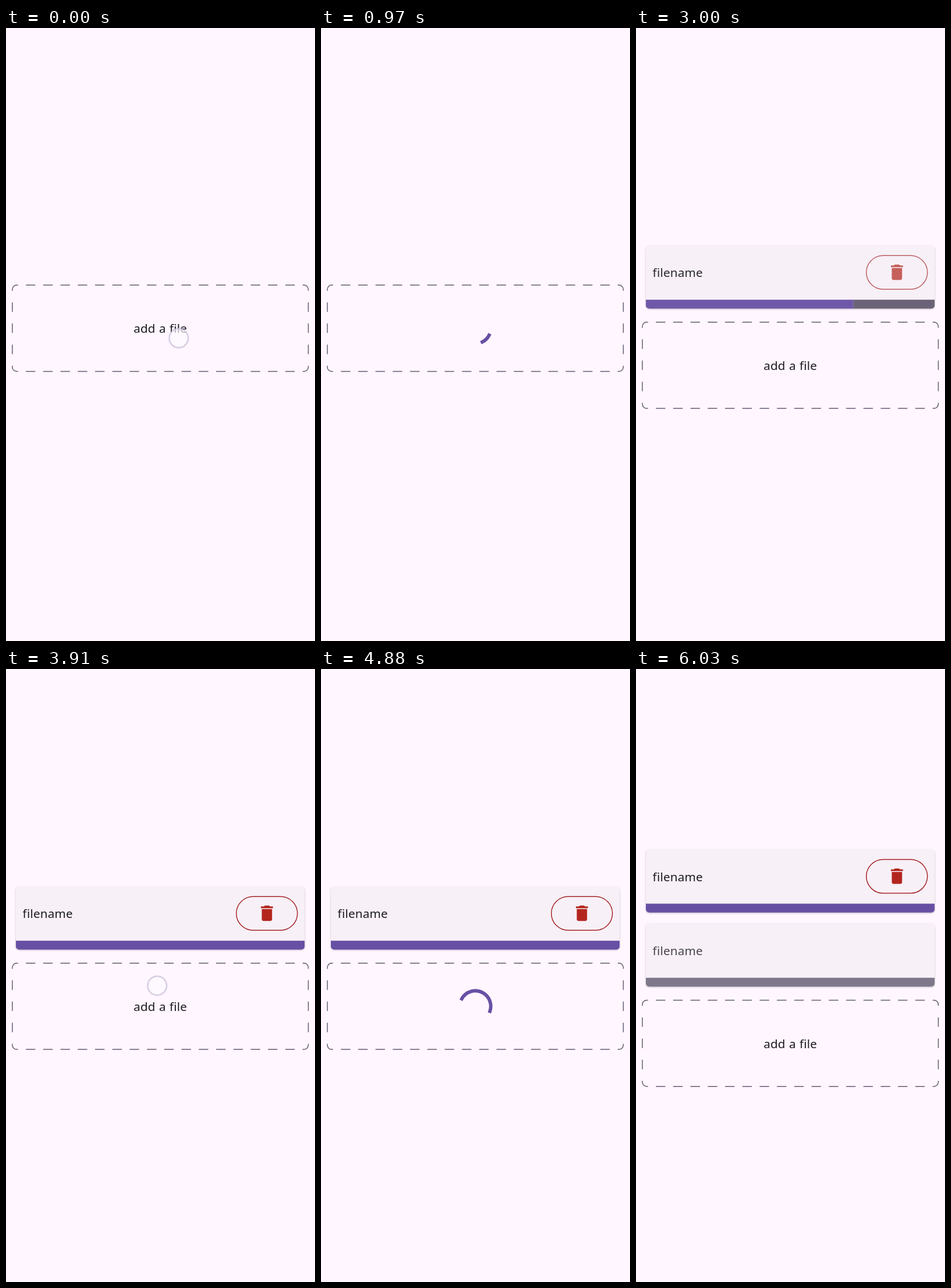
Animation, 531 px wide and 1054 px high, one loop 6210 ms. Source, as an HTML page with a canvas:

```html
<!DOCTYPE html>
<html lang="en">
<head>
<meta charset="utf-8">
<title>File upload</title>
<style>
  html, body { margin: 0; width: 100%; height: 100%; overflow: hidden; background: #fff6ff; }
  canvas { display: block; }
</style>
</head>
<body>
<canvas id="stage" width="531" height="1054"></canvas>
<script>
const ctx = document.getElementById('stage').getContext('2d');
const LOOP = 6210;
const DP = 1.475;            // pixels per layout unit
const HALF_SLOT = 63.7;      // half the height one card takes in the list
const MID_X = 265.2;
const CARD_Y = 428;
const COLOR = {
  page: '#fff6ff', card: '#f7f0f7', text: '#1d1b20', track: '#625b71',
  primary: '#6750a4', danger: '#b3261e', outline: '#a52428'
};
const BIN = new Path2D('M6 19c0 1.1.9 2 2 2h8c1.1 0 2-.9 2-2V7H6v12z' +
                       'M19 4h-3.5l-1-1h-5l-1 1H5v2h14V4z');

const clamp = x => Math.min(1, Math.max(0, x));
const interval = (x, from, to) => clamp((x - from) / (to - from));

function bezier(x1, y1, x2, y2) {
  const at = (a, b, u) => 3 * (1 - u) ** 2 * u * a + 3 * (1 - u) * u * u * b + u ** 3;
  return x => {
    if (x <= 0 || x >= 1) return clamp(x);
    let low = 0, high = 1;
    for (let i = 0; i < 24; i++) {
      const mid = (low + high) / 2;
      if (at(x1, x2, mid) < x) low = mid; else high = mid;
    }
    return at(y1, y2, low);
  };
}
const fastOutSlowIn = bezier(.4, 0, .2, 1);
const easeInOut = bezier(.42, 0, .58, 1);
const easeOutQuart = x => 1 - (1 - x) ** 4;

// A new card first opens its slot, then fades in.
function insertion(t, start) {
  const p = easeInOut(interval(t, start, start + 500));
  return { size: interval(p, 0, 2 / 3), fade: interval(p, 2 / 3, 1) };
}

function label(text, x, y) {
  ctx.font = `${14 * DP}px "Noto Sans", sans-serif`;
  ctx.letterSpacing = '0.2px';
  ctx.wordSpacing = '0.6px';
  ctx.fillStyle = COLOR.text;
  ctx.fillText(text, x, y);
}

function dashedBox(y) {
  const w = 254.3, h = 74.2, dash = 16.3, radius = 7.5, reach = 9.7;
  ctx.save();
  ctx.translate(MID_X, y);
  ctx.strokeStyle = COLOR.track;
  ctx.lineWidth = DP;
  ctx.beginPath();
  for (const sy of [-1, 1]) {
    for (let i = -7.5; i <= 7.5; i++) {
      ctx.moveTo(i * 29.72 - dash / 2, sy * h);
      ctx.lineTo(i * 29.72 + dash / 2, sy * h);
    }
  }
  for (const sx of [-1, 1]) {
    for (let i = -1; i <= 1; i++) {
      ctx.moveTo(sx * w, i * 36.4 - dash / 2);
      ctx.lineTo(sx * w, i * 36.4 + dash / 2);
    }
    for (const sy of [-1, 1]) {
      ctx.moveTo(sx * w, sy * (h - reach));
      ctx.arcTo(sx * w, sy * h, sx * (w - reach), sy * h, radius);
      ctx.lineTo(sx * (w - reach), sy * h);
    }
  }
  ctx.stroke();
  ctx.restore();
}

function spinner(y, elapsed) {
  const cycle = elapsed / 1333 % 1;
  const head = fastOutSlowIn(interval(cycle, 0, .5)) * 1.5 * Math.PI;
  const tail = fastOutSlowIn(interval(cycle, .5, 1)) * 1.5 * Math.PI;
  const start = -Math.PI / 2 + tail + elapsed / 2222 * 2 * Math.PI + cycle * Math.PI / 2;
  ctx.strokeStyle = COLOR.primary;
  ctx.lineWidth = 4 * DP;
  ctx.lineCap = 'square';
  ctx.beginPath();
  ctx.arc(MID_X, y, 18 * DP, start, start + Math.max(head - tail, .001));
  ctx.stroke();
  ctx.lineCap = 'butt';
}

function touch(x, y) {
  ctx.save();
  ctx.beginPath();
  ctx.arc(x, y, 16.3, 0, 2 * Math.PI);
  ctx.fillStyle = 'rgba(253, 251, 255, .7)';
  ctx.fill();
  ctx.strokeStyle = '#d2c8df';
  ctx.lineWidth = 1.6;
  ctx.shadowColor = 'rgba(170, 155, 195, .5)';
  ctx.shadowBlur = 2;
  ctx.stroke();
  ctx.restore();
}

function deleteButton() {
  ctx.strokeStyle = COLOR.outline;
  ctx.lineWidth = DP;
  ctx.beginPath();
  ctx.roundRect(395.8, -36.7, 105, 58, 29);
  ctx.stroke();
  ctx.translate(430.7, -25.7);
  ctx.scale(DP, DP);
  ctx.fillStyle = COLOR.danger;
  ctx.fill(BIN);
}

function card(y, { size, fade }, done) {
  if (!fade) return;
  const left = 16.8, width = 496.6, top = -54.2, height = 108.6, barTop = 39.2;
  const content = fade * (.8 + .2 * done);
  ctx.save();
  ctx.beginPath();
  ctx.rect(0, y - HALF_SLOT * size, 531, 2 * HALF_SLOT * size);
  ctx.clip();
  ctx.translate(0, y);

  ctx.save();
  ctx.globalAlpha = fade;
  ctx.shadowColor = 'rgba(0, 0, 0, .25)';
  ctx.shadowBlur = 2.5;
  ctx.shadowOffsetY = 1.2;
  ctx.fillStyle = COLOR.card;
  ctx.beginPath();
  ctx.roundRect(left, top, width, height, 6);
  ctx.fill();
  ctx.restore();

  ctx.save();
  ctx.clip();
  ctx.globalAlpha = content;
  ctx.fillStyle = COLOR.track;
  ctx.fillRect(left + width * done, barTop, width * (1 - done), 16);
  ctx.fillStyle = COLOR.primary;
  ctx.fillRect(left, barTop, width * done, 16);
  ctx.restore();

  ctx.globalAlpha = content;
  label('filename', 28.6, .3);
  ctx.globalAlpha = fade * done;
  if (done) deleteButton();
  ctx.restore();
}

function draw(t) {
  const first = insertion(t, 1290);
  const second = insertion(t, 5190);
  const uploaded = easeOutQuart(interval(t, 2860, 3380));
  const dropY = 516.2 + HALF_SLOT * (first.size + second.size);

  ctx.fillStyle = COLOR.page;
  ctx.fillRect(0, 0, 531, 1054);
  card(CARD_Y - HALF_SLOT * second.size, first, uploaded);
  card(CARD_Y + HALF_SLOT, second, 0);
  dashedBox(dropY);

  if (t >= 30 && t < 1300) spinner(dropY, t + 88);
  else if (t >= 4000 && t < 5180) spinner(dropY, Math.max(0, t - 4014));
  else label('add a file', 219.2, dropY + 8);

  if (t < 30) touch(296.8, 533.3);
  if (t >= 3910 && t < 4000) touch(259.8, 544.5);
}

function frame() {
  draw(performance.now() % LOOP);
  requestAnimationFrame(frame);
}
frame();
</script>
</body>
</html>
```
